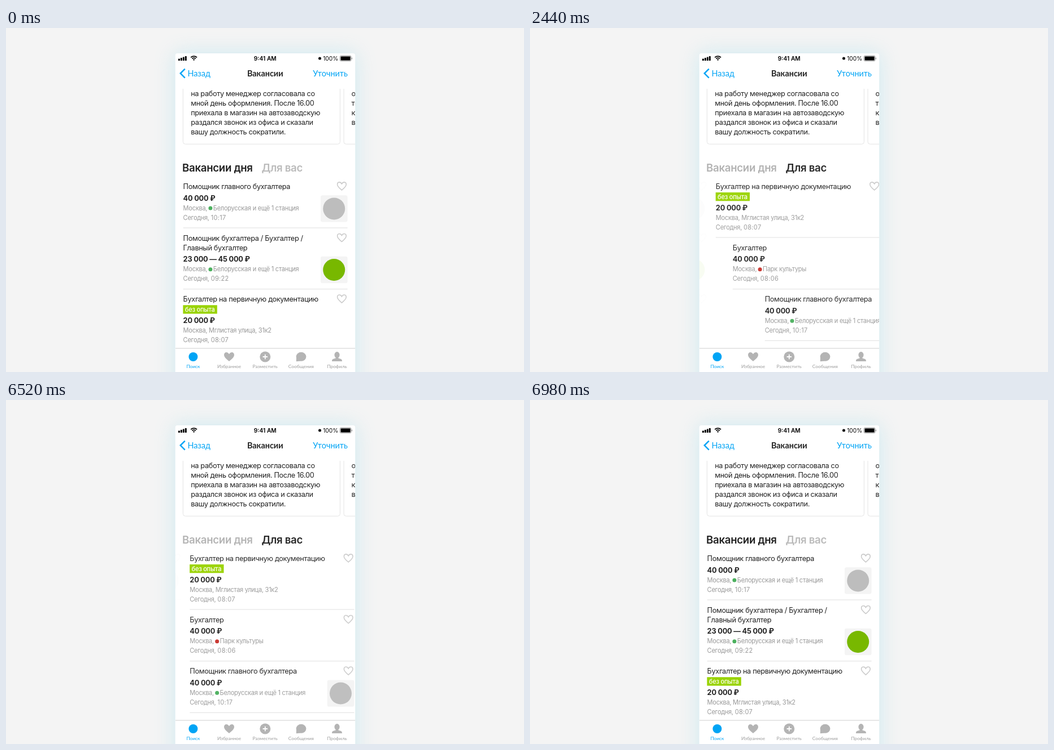
Write an HTML page with a canvas that moves like this. It is 917 px wide and 611 px high and loops after 7.78 s.

```html
<!DOCTYPE html>
<html lang="ru">
<head>
<meta charset="utf-8">
<title>Вакансии</title>
<style>
  html, body { margin: 0; width: 100%; height: 100%; overflow: hidden; background: #f4f4f4; }
  canvas { display: block; width: 917px; height: 611px; }
</style>
</head>
<body>
<canvas id="stage"></canvas>
<script>
const W = 917, H = 611, LOOP = 7780;
const FORWARD = 2200, BACK = 6520;
const STEP = 20, SLIDE = 360, STAGGER = 60, DISTANCE = 306;
const LEFT = 299.7, RIGHT = 618.2, TOP = 45, TAB_TOP = 569;
const BLUE = '#00a4f5', INK = '#222', MUTED = '#999', ICON = '#b4b4b4';

const canvas = document.getElementById('stage');
const ctx = canvas.getContext('2d');
const ratio = window.devicePixelRatio || 1;
canvas.width = Math.round(W * ratio);
canvas.height = Math.round(H * ratio);

const inter = (weight, size, tracking) => ({
  font: `${weight} ${size}px Inter, sans-serif`, spacing: `${size * tracking}px`
});
const lato = (weight, size) => ({
  font: `${weight} ${size}px Lato, sans-serif`, spacing: '0px'
});
const BODY = inter(400, 12.72, -0.027);
const PRICE = inter(700, 12.72, -0.015);
const META = inter(400, 11.02, -0.023);
const TIME = inter(400, 11.02, 0.03);
const BADGE = inter(500, 11.02, -0.02);
const HEADING = inter(600, 18.66, -0.016);
const CLOCK = inter(600, 10.2, 0);
const CHARGE = inter(400, 10.2, 0);
const NAV = lato(400, 14.4);
const NAV_BOLD = lato(700, 14.4);
const TAB = lato(400, 8.35);

const GREEN = '#4bb05e', RED = '#c8322c';
const GLOBE = '#bdbdbd', ROOF = '#78b800';

const assistant = {
  title: ['Помощник главного бухгалтера'], price: '40 000 ₽',
  place: 'Белорусская и ещё 1 станция', dot: GREEN, time: '10:17', logo: GLOBE
};
const documents = {
  title: ['Бухгалтер на первичную документацию'], badge: true, price: '20 000 ₽',
  place: 'Мглистая улица, 31к2', time: '08:07'
};
const daily = [
  assistant,
  {
    title: ['Помощник бухгалтера / Бухгалтер /', 'Главный бухгалтер'],
    price: '23 000 — 45 000 ₽',
    place: 'Белорусская и ещё 1 станция', dot: GREEN, time: '09:22', logo: ROOF
  },
  documents
];
const personal = [
  documents,
  {
    title: ['Бухгалтер'], price: '40 000 ₽',
    place: 'Парк культуры', dot: RED, time: '08:06'
  },
  assistant
];

// Returns the advance width of the drawn string.
function text(str, x, y, style, color, align = 'left') {
  ctx.font = style.font;
  ctx.letterSpacing = style.spacing;
  ctx.fillStyle = color;
  ctx.textAlign = align;
  ctx.fillText(str, x, y);
  return ctx.measureText(str).width;
}

function rect(x, y, w, h, color, radius = 0) {
  ctx.fillStyle = color;
  ctx.beginPath();
  ctx.roundRect(x, y, w, h, radius);
  ctx.fill();
}

function disc(x, y, r, color) {
  ctx.fillStyle = color;
  ctx.beginPath();
  ctx.arc(x, y, r, 0, Math.PI * 2);
  ctx.fill();
}

function stroke(color, width) {
  ctx.strokeStyle = color;
  ctx.lineWidth = width;
  ctx.stroke();
}

function heartPath(cx, cy, w) {
  const h = w / 2;
  ctx.beginPath();
  ctx.moveTo(cx, cy + h * 0.92);
  ctx.bezierCurveTo(cx - h * 0.5, cy + h * 0.5, cx - h, cy + h * 0.12, cx - h, cy - h * 0.36);
  ctx.bezierCurveTo(cx - h, cy - h * 1.0, cx - h * 0.28, cy - h * 1.05, cx, cy - h * 0.5);
  ctx.bezierCurveTo(cx + h * 0.28, cy - h * 1.05, cx + h, cy - h * 1.0, cx + h, cy - h * 0.36);
  ctx.bezierCurveTo(cx + h, cy + h * 0.12, cx + h * 0.5, cy + h * 0.5, cx, cy + h * 0.92);
  ctx.closePath();
}

// cubic-bezier(.25, .1, .25, 1)
function ease(x) {
  if (x <= 0) return 0;
  if (x >= 1) return 1;
  const curve = (s, a, b) => 3 * (1 - s) * (1 - s) * s * a + 3 * (1 - s) * s * s * b + s * s * s;
  let lo = 0, hi = 1;
  for (let i = 0; i < 24; i++) {
    const mid = (lo + hi) / 2;
    if (curve(mid, 0.25, 0.25) < x) lo = mid; else hi = mid;
  }
  return curve(lo, 0.1, 1);
}

function drawBadge(y) {
  rect(313.4, y - 11.2, 60.4, 15.2, '#99d300');
  // The label stays pure white while the badge fades towards white.
  ctx.save();
  ctx.globalAlpha = 1;
  text('без опыта', 316.8, y + 0.3, BADGE, '#fff');
  ctx.restore();
}

function drawRow(item, base) {
  heartPath(594.4, base - 5.5, 15.6);
  stroke('#cbcbcb', 1.6);

  item.title.forEach((line, i) => text(line, 313.6, base + i * 17, BODY, INK));
  let y = base + (item.title.length - 1) * 17;
  if (item.badge) {
    y += 17;
    drawBadge(y);
  }
  y += 20.4;
  text(item.price, 313.6, y, PRICE, INK);
  if (item.logo) {
    rect(557, y - 9.4, 47.5, 47.4, '#f4f4f4', 3);
    disc(580.7, y + 14.3, 19.5, item.logo);
  }
  y += 17.1;
  if (item.dot) {
    text('Москва,', 313.6, y, META, MUTED);
    disc(361.9, y - 3.6, 3.5, item.dot);
    text(item.place, 366.8, y, META, MUTED);
  } else {
    text('Москва, ' + item.place, 313.6, y, META, MUTED);
  }
  y += 17;
  const dayWidth = text('Сегодня, ', 313.6, y, META, MUTED);
  text(item.time, 313.6 + dayWidth, y, TIME, MUTED);
  rect(313.6, y + 13.9, 291, 1, '#dedede');
  return y + 37.1;
}

function drawList(list, alpha, shift) {
  if (alpha <= 0) return;
  ctx.save();
  ctx.globalAlpha = alpha;
  let base = 286.2;
  list.forEach((item, i) => {
    ctx.save();
    ctx.translate(shift(i), 0);
    base = drawRow(item, base);
    ctx.restore();
  });
  ctx.restore();
}

function drawStatusBar() {
  for (let i = 0; i < 4; i++) {
    const h = 3.6 + i * 1.5;
    rect(305 + i * 3.95, 58 - h, 2.9, h, '#000', 0.6);
  }
  for (const r of [7.6, 4.6]) {
    ctx.beginPath();
    ctx.arc(332.6, 57.8, r, -Math.PI * 0.75, -Math.PI * 0.25);
    stroke('#000', 1.8);
  }
  ctx.fillStyle = '#000';
  ctx.beginPath();
  ctx.moveTo(332.6, 58);
  ctx.arc(332.6, 57.8, 2.5, -Math.PI * 0.75, -Math.PI * 0.25);
  ctx.fill();

  text('9:41 AM', 458.8, 57.5, CLOCK, '#000', 'center');
  disc(555.5, 54, 2.5, '#000');
  text('100%', 588.2, 57.5, CHARGE, '#000', 'right');
  ctx.beginPath();
  ctx.roundRect(591.2, 49.4, 19.8, 9.2, 2);
  stroke('#777', 0.8);
  rect(592.5, 50.6, 17.2, 6.8, '#000', 1);
  rect(611.8, 52.4, 1, 3.2, '#777', 0.5);
}

function drawNav() {
  ctx.beginPath();
  ctx.moveTo(316.8, 72.6);
  ctx.lineTo(308.8, 80.6);
  ctx.lineTo(316.8, 88.6);
  stroke(BLUE, 2.5);
  text('Назад', 321.4, 85.8, NAV, BLUE);
  text('Вакансии', 458.8, 85.8, NAV_BOLD, INK, 'center');
  text('Уточнить', 574.1, 85.8, NAV, BLUE, 'center');
}

function drawCards() {
  const review = [
    'на работу менеджер согласовала со',
    'мной день оформления. После 16.00',
    'приехала в магазин на автозаводскую',
    'раздался звонок из офиса и сказали',
    'вашу должность сократили.'
  ];
  ctx.save();
  ctx.beginPath();
  ctx.rect(LEFT, 108, RIGHT - LEFT, 110);
  ctx.clip();
  for (const x of [313.4, 598]) {
    ctx.beginPath();
    ctx.roundRect(x, 60, 278, 146.2, 4);
    stroke('#e4e4e4', 1);
  }
  review.forEach((line, i) => text(line, 327.2, 120.7 + i * 16.96, BODY, INK));
  ['о', 'т', 'к', 'в'].forEach((s, i) => text(s, 611.6, 120.7 + i * 16.96, BODY, INK));
  ctx.restore();
}

function drawTabs() {
  rect(LEFT, TAB_TOP, RIGHT - LEFT, H - TAB_TOP, '#fff');
  rect(LEFT, TAB_TOP - 0.5, RIGHT - LEFT, 1, '#cfcfcf');
  const labels = ['Поиск', 'Избранное', 'Разместить', 'Сообщения', 'Профиль'];
  labels.forEach((label, i) =>
    text(label, 331.5 + i * 63.6, 604, TAB, i ? '#9b9b9b' : BLUE, 'center'));

  disc(331.4, 584, 8, BLUE);

  heartPath(395, 583.8, 18);
  ctx.fillStyle = ICON;
  ctx.fill();

  disc(458.8, 584, 9.5, ICON);
  rect(454.6, 583.1, 8.4, 1.8, '#fff');
  rect(457.9, 579.8, 1.8, 8.4, '#fff');

  ctx.fillStyle = ICON;
  ctx.beginPath();
  ctx.ellipse(522.5, 583.8, 8.9, 8, 0, 0, Math.PI * 2);
  ctx.fill();
  ctx.beginPath();
  ctx.moveTo(514, 584);
  ctx.lineTo(513.8, 592.2);
  ctx.lineTo(521, 591.6);
  ctx.fill();

  ctx.beginPath();
  ctx.ellipse(586, 580.6, 4.6, 5.6, 0, 0, Math.PI * 2);
  ctx.fill();
  rect(583.6, 584, 4.8, 5, ICON);
  ctx.beginPath();
  ctx.moveTo(577, 592);
  ctx.bezierCurveTo(577, 587.5, 580, 588, 583.6, 586.6);
  ctx.lineTo(588.4, 586.6);
  ctx.bezierCurveTo(592, 588, 595, 587.5, 595, 592);
  ctx.closePath();
  ctx.fill();
}

function phonePath() {
  ctx.beginPath();
  ctx.roundRect(LEFT, TOP, RIGHT - LEFT, H, [4, 4, 0, 0]);
}

function headingColor(active) {
  const v = Math.round(187 - active * 153);
  return `rgb(${v},${v},${v})`;
}

function draw(time) {
  const forward = time >= FORWARD && time < BACK;
  const start = forward ? FORWARD : BACK;
  const since = time < FORWARD ? Infinity : (Math.floor((time - start) / STEP) + 1) * STEP;
  const progress = ease(since / SLIDE);
  const side = forward ? 1 : -1;

  ctx.setTransform(ratio, 0, 0, ratio, 0, 0);
  rect(0, 0, W, H, '#f4f4f4');
  ctx.save();
  ctx.shadowColor = 'rgba(125,215,235,0.32)';
  ctx.shadowBlur = 36 * ratio;
  ctx.fillStyle = '#fff';
  phonePath();
  ctx.fill();
  ctx.restore();

  ctx.save();
  phonePath();
  ctx.clip();
  drawStatusBar();
  drawNav();
  drawCards();

  const dayActive = forward ? 1 - progress : progress;
  text('Вакансии дня', 312, 254.8, HEADING, headingColor(dayActive));
  text('Для вас', 452.6, 254.8, HEADING, headingColor(1 - dayActive));

  const [outgoing, incoming] = forward ? [daily, personal] : [personal, daily];
  drawList(outgoing, 1 - progress, () => -side * DISTANCE * progress);
  drawList(incoming, progress,
    i => side * DISTANCE * (1 - ease((since - i * STAGGER) / SLIDE)));

  drawTabs();
  ctx.restore();
}

const origin = performance.now();
function tick() {
  draw((performance.now() - origin) % LOOP);
  requestAnimationFrame(tick);
}
tick();
</script>
</body>
</html>
```
